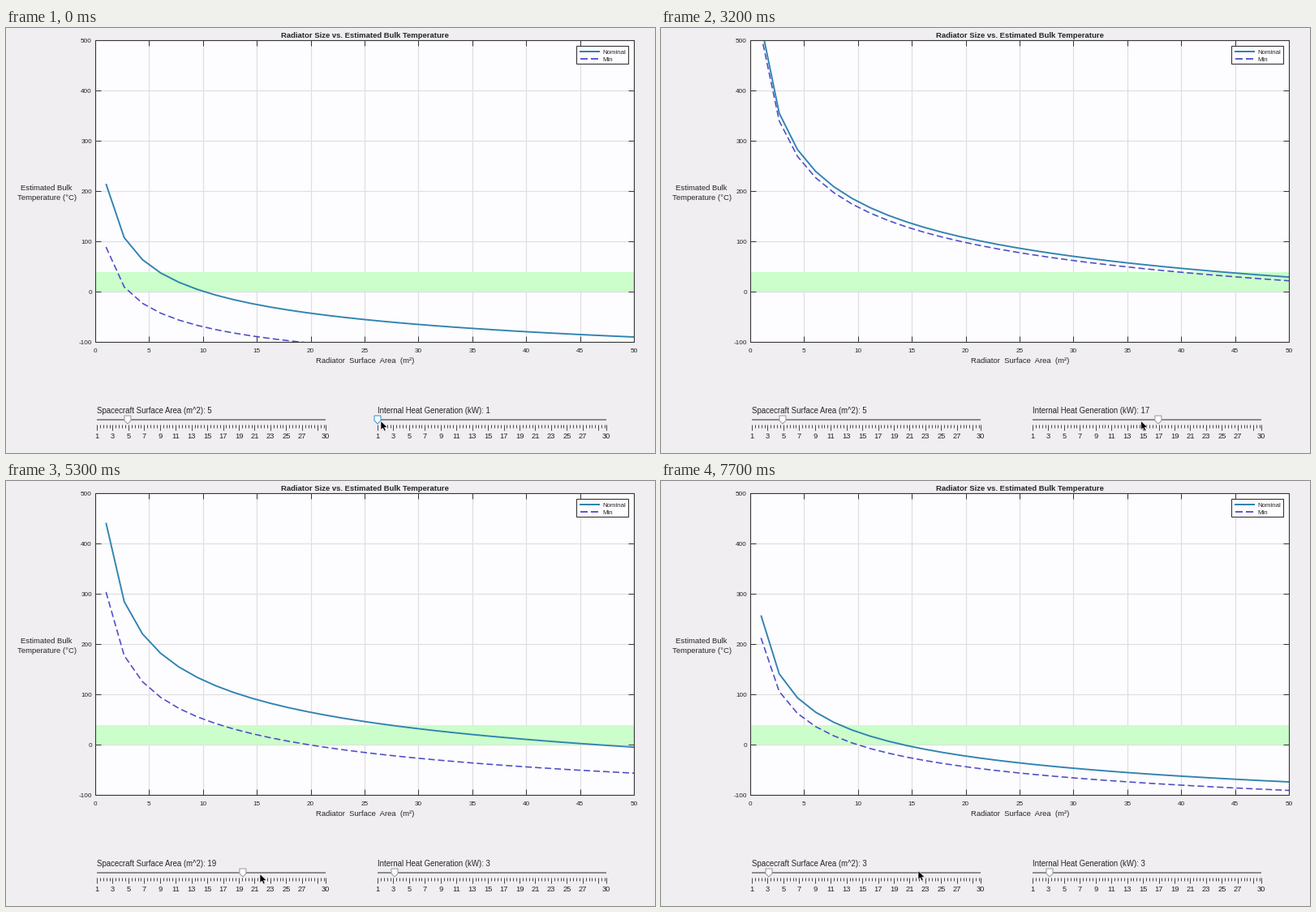
Animation of 800 by 524 pixels, one loop 7800 ms. Source, as a matplotlib script:

```python
import numpy as np
import matplotlib.pyplot as plt
from matplotlib.animation import FuncAnimation
from matplotlib.patches import Polygon, Rectangle

W, H, DPI = 800, 524, 100
FRAMES, STEP = 78, 100
PT = 72 / DPI  # points per pixel

plt.rcParams["font.family"] = "Liberation Sans"
plt.rcParams["lines.scale_dashes"] = False

BACK, PAPER, GRID, INK = "#f0eef1", "#fdfcfe", "#dfdee1", "#363636"
BLUE, VIOLET = "#3083b0", "#4c4cc8"
LEFT, RIGHT, TOP, BOTTOM = 110, 774, 15, 387.4

fig = plt.figure(figsize=(W / DPI, H / DPI), dpi=DPI, facecolor=BACK)
ax = fig.add_axes([0, 0, 1, 1])
ax.set_xlim(0, W)
ax.set_ylim(H, 0)
ax.axis("off")


def px(area):
    return LEFT + (RIGHT - LEFT) * area / 50


def py(temp):
    return BOTTOM - (BOTTOM - TOP) * (temp + 100) / 600


def line(xs, ys, color=INK, width=1.0, z=2, dash=None):
    style = {"dashes": (dash * PT, 4 * PT), "dash_capstyle": "butt"} if dash else {}
    return ax.plot(xs, ys, color=color, lw=width * PT, zorder=z,
                   solid_capstyle="butt", **style)[0]


def box(x0, y0, x1, y1, fc="none", ec="none", z=0):
    return ax.add_patch(Rectangle((x0, y0), x1 - x0, y1 - y0, fc=fc, ec=ec,
                                  lw=1.1 * PT, zorder=z))


def text(x, y, s, size=9.5, ha="center", **kw):
    return ax.text(x, y, s, fontsize=size * PT, ha=ha, color="#262626",
                   va="center_baseline", zorder=8, **kw)


# Plot area
paper = box(LEFT, TOP, RIGHT, BOTTOM, fc=PAPER)
for a in range(0, 51, 5):
    x = px(a)
    line([x, x], [TOP, BOTTOM], GRID, 1.2, 1)
    line([x, x], [BOTTOM, BOTTOM - 7], z=4)
    line([x, x], [TOP, TOP + 7], z=4)
    text(x, 398, str(a), 8.1)
for t in range(-100, 501, 100):
    y = py(t)
    line([LEFT, RIGHT], [y, y], GRID, 1.2, 1)
    line([LEFT, LEFT + 7], [y, y], z=4)
    line([RIGHT, RIGHT - 7], [y, y], z=4)
    text(106, y + 0.5, str(t), 8.1, "right")
box(LEFT, py(40), RIGHT, py(0), fc="#cbfecb", z=1.5)
box(LEFT, TOP, RIGHT, BOTTOM, ec=INK, z=4)

text(442.5, 8, "Radiator Size vs. Estimated Bulk Temperature", weight="bold")
text(442.5, 409.5, "Radiator  Surface  Area  (m²)")
text(50, 196, "Estimated Bulk")
text(50.5, 208, "Temperature (°C)")

# Curves
nominal = line([], [], BLUE, 1.9, 3)
minimum = line([], [], VIOLET, 1.6, 3, dash=8)
for curve in (nominal, minimum):
    curve.set_clip_path(paper)

# Legend
box(703, 22, 767, 44, fc=PAPER, ec=INK, z=5)
line([707, 732], [29, 29], BLUE, 2, 6)
line([708, 732], [38, 38], VIOLET, 1.8, 6, dash=9)
text(735, 29.5, "Nominal", 7.9, "left")
text(735, 38.5, "Min", 7.9, "left")

SPEED = 14.5  # slider units per second while dragging
LAG = 0.15    # seconds the slider trails the pointer
UNIT = 282 / 29
AREA = np.linspace(1, 50, 30)


class Slider:
    """Dragged from `start` up to `high` at time `peak`, then down to `end`."""

    def __init__(self, x0, name, start, high, peak, end):
        self.x0, self.name = x0, name
        self.start, self.high, self.peak, self.end = start, high, peak, end
        line([x0, x0 + 282], [483, 483], "#8b8b8d", 2, 4)
        for k in range(73):
            self.tick(1 + 0.4 * k, 493 if k % 5 else 496)
        self.tick(30, 496)
        for v in [*range(1, 28, 2), 30]:
            text(self.pos(v), 502, str(v), 9.4)
        self.label = text(x0, 471, "", 9.6, "left")
        self.thumb = Polygon([(0, 0)], fc="#fbfbfc", lw=PT, zorder=6)
        ax.add_patch(self.thumb)

    def tick(self, v, y):
        line([self.pos(v)] * 2, [489, y], "#4a4a4a", 1, 4)

    def pos(self, v):
        return self.x0 + (v - 1) * UNIT

    def drag(self, t):
        floor = self.start if t < self.peak else self.end
        return max(floor, self.high - SPEED * abs(t - self.peak))

    def show(self, t, hot=False):
        v = self.drag(t - LAG)
        x = self.pos(v)
        self.thumb.set_xy([(x - 4, 478), (x + 4, 478), (x + 4, 484),
                           (x, 488), (x - 4, 484)])
        self.thumb.set_edgecolor("#2f93d0" if hot else "#9a9a9c")
        self.label.set_text(f"{self.name}: {round(v)}")
        return round(v)


surface = Slider(112, "Spacecraft Surface Area (m^2)", 4.9, 28.4, 5.764, 3.16)
heat = Slider(458, "Internal Heat Generation (kW)", 1, 29.4, 2.19, 3.16)

ARROW = np.array([(0, 0), (0, 11), (2.5, 8.7), (4.4, 12.6), (6.2, 11.8),
                  (4.5, 8), (8, 7.8)])
cursor = Polygon(ARROW, fc="black", ec="white", lw=0.6 * PT, zorder=10)
ax.add_patch(cursor)


def pointer(t):
    # Follows the heat slider, hops to the surface slider, then leaves it.
    hop = np.clip((t - 4) / 0.15, 0, 1)
    away = max(0, t - 7.5)
    x = heat.pos(heat.drag(t)) * (1 - hop) + surface.pos(surface.drag(t)) * hop
    return max(x + 920 * away, 150 if t < 5 else 0) + (4 if t < 0.2 else 0), 484.5 - 20 * away


def temps(q, s, gain):
    # Radiative balance: T^4 is proportional to power over area.
    power = 2.26e10 * (q - 1) + gain * s
    return (power / AREA) ** 0.25 - 273


def update(i):
    t = i * STEP / 1000
    q, s = heat.show(t, hot=t < 0.2), surface.show(t)
    nominal.set_data(px(AREA), py(temps(q, s, 1.13e10)))
    minimum.set_data(px(AREA), py(temps(q, s, 0.344e10)))
    cursor.set_xy(ARROW + pointer(t))
    return nominal, minimum, cursor


anim = FuncAnimation(fig, update, frames=FRAMES, interval=STEP, repeat=True,
                     repeat_delay=0, blit=False)
plt.show()
```
